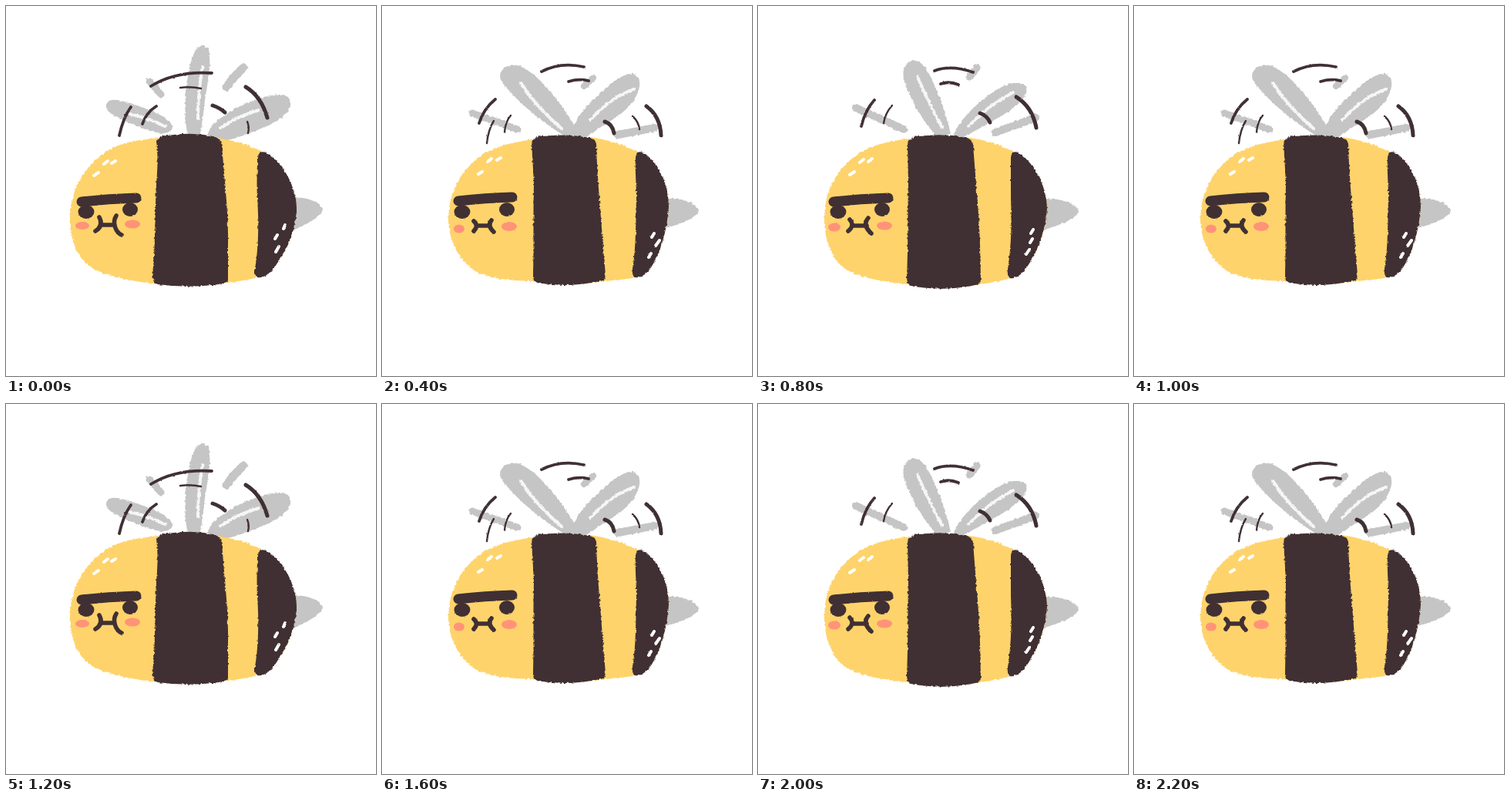
Write an HTML page without scripts that moves like this. It is 480x480 px and loops after 2400 ms.

```html
<!DOCTYPE html>
<html lang="en">
<head>
<meta charset="utf-8">
<title>Grumpy bee</title>
<style>
html, body { margin: 0; width: 100%; height: 100%; overflow: hidden; background: #fff; }
svg { display: block; width: 100%; height: 100%; }
path, line { stroke-linecap: round; stroke-linejoin: round; }
.pose { visibility: hidden; animation: show 600ms step-end infinite; }
.second { animation-delay: -400ms; }
.third { animation-delay: -200ms; }
@keyframes show {
  0% { visibility: visible; }
  33.333%, 100% { visibility: hidden; }
}
.bulk { filter: url(#crayon); }
.detail { filter: url(#pencil); }
.wing { fill: #c5c5c5; }
.stub { fill: none; stroke: #c5c5c5; }
.vein { fill: none; stroke: #fff; stroke-width: 4; opacity: .85; }
.body { fill: #ffd36b; }
.dark { fill: #403033; }
.ink { fill: none; stroke: #403033; stroke-width: 3.8; }
.bold { stroke-width: 5; }
.thin { stroke-width: 2.4; }
.mouth { stroke-width: 5.6; }
.brow { stroke-width: 13; }
.blush { fill: #ff9378; }
.shine { fill: none; stroke: #fff; stroke-width: 4; }
</style>
</head>
<body>
<svg viewBox="0 0 480 480">
  <defs>
    <filter id="crayon" filterUnits="userSpaceOnUse" x="0" y="0" width="480" height="480" color-interpolation-filters="sRGB">
      <feTurbulence type="fractalNoise" baseFrequency=".28" numOctaves="2" seed="4"/>
      <feDisplacementMap in="SourceGraphic" scale="3.5" xChannelSelector="R" yChannelSelector="G"/>
    </filter>
    <filter id="pencil" filterUnits="userSpaceOnUse" x="0" y="0" width="480" height="480" color-interpolation-filters="sRGB">
      <feTurbulence type="fractalNoise" baseFrequency=".3" numOctaves="2" seed="7"/>
      <feDisplacementMap in="SourceGraphic" scale="2" xChannelSelector="R" yChannelSelector="G"/>
    </filter>
  </defs>

  <!-- wings spread in a fan -->
  <g class="pose">
    <g class="bulk">
      <path class="wing" d="M134 123C143 119 160 126 178 132C196 138 214 147 216 157C215 165 205 166 195 164C174 159 153 149 137 140C128 134 128 127 134 123Z"/>
      <path class="vein" d="M160 140Q184 145 206 156"/>
      <path class="wing" d="M247 56C251 50 260 51 263 57C267 72 262 98 258 122C256 140 254 155 252 166L236 166C231 150 232 126 234 107C236 86 240 66 247 56Z"/>
      <path class="vein" d="M255 79Q249 112 249 146"/>
      <path class="wing" d="M262 168C262 156 280 143 296 134C316 123 341 114 359 115C370 117 372 128 366 136C358 148 338 157 318 164C303 170 283 177 268 176Z"/>
      <path class="vein" d="M328 135Q300 143 279 158"/>
      <path class="stub" stroke-width="9" d="M186 98L193 105L201 115"/>
      <path class="stub" stroke-width="11" d="M308 80Q296 91 286 105"/>
      <path class="wing" d="M372 249C387 247 405 253 411 263C410 273 387 285 370 292Z"/>

      <path class="body" d="M83 275C84 237 101 208 130 189C148 177 171 174 197 171C230 165 261 167 284 173C309 177 334 187 350 202C368 222 377 243 377 263C375 292 363 323 345 341C335 353 314 355 288 359C253 365 216 364 190 360C158 356 125 350 106 336C88 320 83 296 83 275Z"/>
      <path class="dark" d="M195 175Q197 169 210 168Q240 163 269 169Q279 172 280 180C283 222 289 270 288 310L288 354Q288 360 281 360Q240 367 197 361Q190 359 190 350C194 311 193 270 195 230C197 209 197 190 195 175Z"/>
      <path class="dark" d="M326 197Q328 187 338 190C361 205 377 236 377 263C376 292 363 318 349 338C341 350 332 353 326 352Q322 350 323 341C328 311 328 279 326 249C325 229 326 211 326 197Z"/>
    </g>
    <g class="detail">
      <path class="shine" d="M127 205L132 201M137 204L142 201M114 220L120 216M360 289L362 284M349 302L352 297M350 319L354 312"/>
      <path class="ink brow" d="M98 254Q133 250 169 249"/>
      <ellipse class="dark" cx="104" cy="267" rx="10.5" ry="9"/>
      <ellipse class="dark" cx="161" cy="264" rx="10" ry="9"/>
      <path class="ink mouth" d="M121 274Q127 285 116 292M124 284H141M143 272C137 282 143 294 150 297"/>
      <ellipse class="blush" cx="99" cy="285" rx="9" ry="5"/>
      <ellipse class="blush" cx="164" cy="283" rx="10" ry="5.5"/>
      <path class="ink" d="M188 104Q220 84 267 87M162 131Q152 145 147 168M195 130Q182 138 177 153"/>
      <path class="ink bold" d="M268 129Q277 132 284 138M311 105Q331 117 339 145"/>
      <path class="ink thin" d="M226 106Q240 104 253 107M313 150Q316 157 314 165"/>
    </g>
  </g>

  <!-- wings on the way up -->
  <g class="pose second">
    <g class="bulk">
      <path class="wing" d="M192 76C199 67 211 70 219 83C232 105 244 138 250 166L232 169C215 151 199 124 191 101C187 90 188 82 192 76Z"/>
      <path class="vein" d="M207 92Q222 127 239 158"/>
      <path class="wing" d="M254 168C257 153 283 126 306 111C323 100 340 96 347 104C353 113 341 127 323 138C302 151 280 163 264 171Z"/>
      <path class="vein" d="M331 112Q297 130 273 156"/>
      <path class="stub" stroke-width="10" d="M127 132L189 160"/>
      <path class="stub" stroke-width="10" d="M308 164L360 145"/>
      <path class="stub" stroke-width="9" d="M274 92L284 80"/>
      <path class="wing" d="M371 251C389 248 412 256 416 266C413 277 389 285 369 291Z"/>

      <path class="body" d="M86 277C86 240 102 211 130 192C150 179 173 175 197 172C228 166 258 168 281 172C309 177 333 187 351 203C367 222 375 242 375 264C373 294 361 324 345 343C334 354 314 357 289 361C254 368 219 367 193 361C159 357 127 352 109 338C92 322 86 297 86 277Z"/>
      <path class="dark" d="M194 176Q197 170 209 169Q240 165 269 170Q278 173 279 180C282 222 287 270 288 310L289 355Q289 361 282 362Q240 371 199 363Q193 361 193 352C195 311 194 270 195 230Z"/>
      <path class="dark" d="M328 197Q329 187 338 190C360 205 375 236 375 263C373 292 362 320 348 340C340 351 332 354 327 353Q323 351 324 342C329 311 329 279 328 249Z"/>
    </g>
    <g class="detail">
      <path class="shine" d="M132 203L137 199M143 202L148 198M119 219L125 215M354 295L357 290M353 307L356 302M348 322L352 316"/>
      <path class="ink brow" d="M98 254Q133 250 169 249"/>
      <ellipse class="dark" cx="104" cy="267" rx="10.5" ry="9"/>
      <ellipse class="dark" cx="161" cy="264" rx="10" ry="9"/>
      <path class="ink mouth" d="M119 277Q126 285 117 292M123 285H141M143 275Q135 284 147 295"/>
      <ellipse class="blush" cx="99" cy="287" rx="8" ry="5.5"/>
      <ellipse class="blush" cx="164" cy="285" rx="10" ry="5.5"/>
      <path class="ink" d="M229 84Q250 76 279 86M237 101Q248 97 260 102M151 122Q139 135 134 156"/>
      <path class="ink bold" d="M288 139Q297 142 301 151M335 118Q356 131 361 158"/>
      <path class="ink thin" d="M174 129Q165 139 163 152"/>
    </g>
  </g>

  <!-- wings raised in a V -->
  <g class="pose third">
    <g class="bulk">
      <path class="wing" d="M153 91C154 79 167 74 179 78C199 87 218 109 233 130C243 144 252 158 257 170L236 168C211 153 184 131 167 112C158 103 153 96 153 91Z"/>
      <path class="vein" d="M180 99Q196 127 233 159"/>
      <path class="wing" d="M246 169C245 152 263 132 279 117C296 101 314 86 326 88C336 92 336 104 331 114C323 133 305 144 287 155C276 162 267 170 260 171Z"/>
      <path class="vein" d="M327 108Q297 118 270 148"/>
      <path class="stub" stroke-width="9" d="M117 139L176 160"/>
      <path class="stub" stroke-width="10" d="M306 167L354 158"/>
      <path class="stub" stroke-width="8" d="M262 104L274 93"/>
      <path class="wing" d="M368 250C387 248 408 256 411 265C409 275 386 283 368 288Z"/>

      <path class="body" d="M86 276C87 240 103 212 130 193C148 181 171 177 195 173C227 167 257 168 276 171C305 176 333 187 350 202C365 220 372 240 372 260C370 291 361 323 345 344C336 354 315 354 290 357C255 363 222 361 196 357C164 356 137 354 118 342C96 325 86 299 86 276Z"/>
      <path class="dark" d="M194 176Q197 169 208 169Q240 165 269 171Q277 172 278 179C279 224 284 267 286 302L290 349Q290 356 283 357Q240 366 201 359Q196 358 196 350C197 310 196 268 197 230Z"/>
      <path class="dark" d="M329 197Q330 187 339 190C360 204 372 235 372 260C370 291 361 322 348 341C340 351 333 353 328 352Q324 350 325 341C330 310 329 278 330 249C330 229 328 211 329 197Z"/>
    </g>
    <g class="detail">
      <path class="shine" d="M137 202L142 198M149 200L154 197M125 218L130 215M350 300L353 295M355 311L360 304M346 326L349 321"/>
      <path class="ink brow" d="M99 253Q133 249 169 248"/>
      <ellipse class="dark" cx="104" cy="267" rx="10.5" ry="9"/>
      <ellipse class="dark" cx="162" cy="264" rx="10" ry="9"/>
      <path class="ink mouth" d="M119 279Q126 285 119 292M123 285H140M142 278Q136 285 145 293"/>
      <ellipse class="blush" cx="100" cy="289" rx="7" ry="5.5"/>
      <ellipse class="blush" cx="165" cy="286" rx="10" ry="6"/>
      <path class="ink" d="M207 85Q232 72 262 79M242 98Q255 94 268 97M147 121Q132 133 126 152"/>
      <path class="ink bold" d="M289 150Q299 153 301 165M343 130Q361 143 362 168"/>
      <path class="ink thin" d="M145 149Q138 160 136 178M167 142Q160 150 159 164M325 143Q333 150 334 160"/>
    </g>
  </g>
</svg>
</body>
</html>
```
